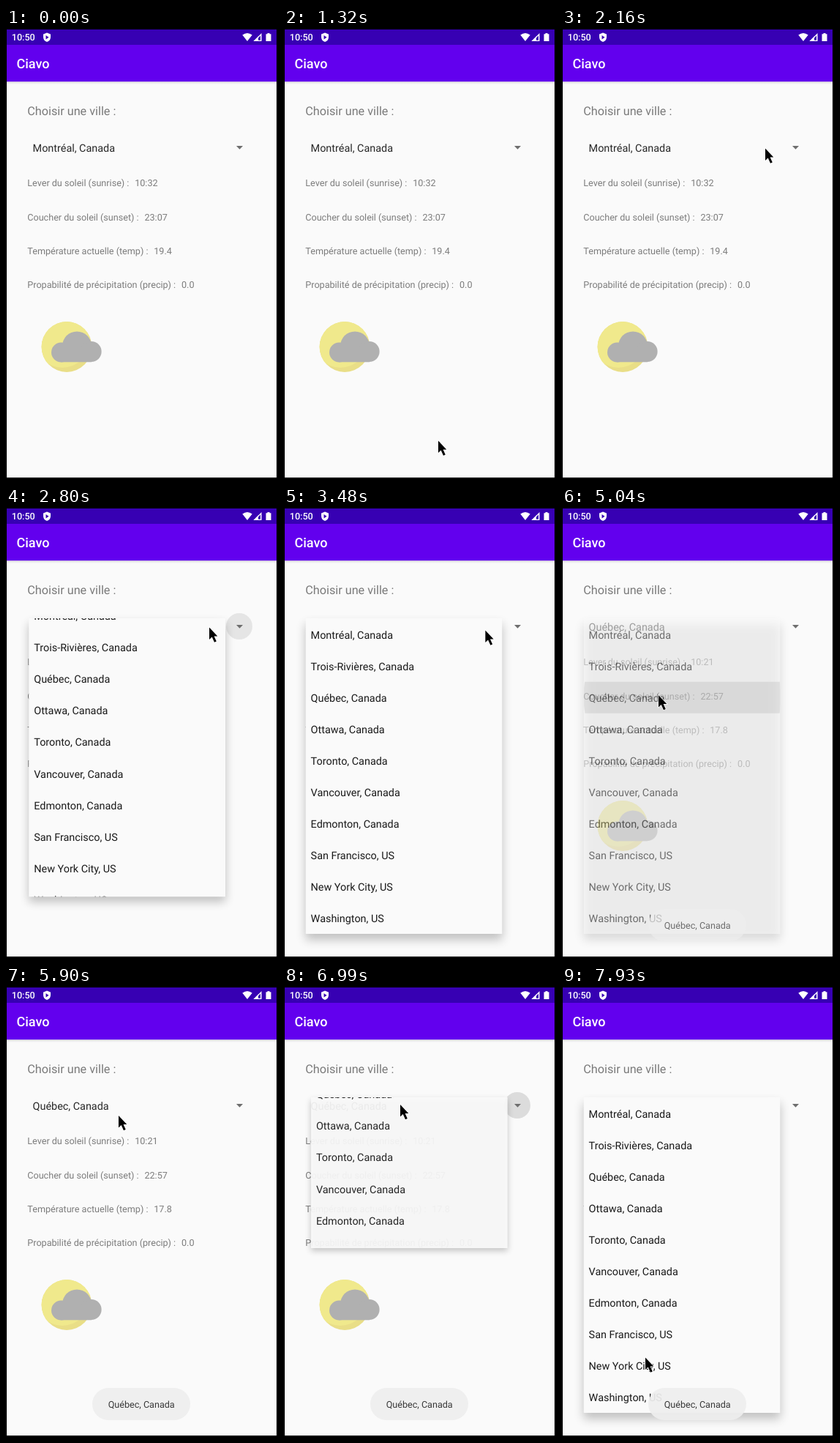
Write an HTML page that moves like this. It is 372 px wide and 616 px high and loops after 8000 ms.

```html
<!DOCTYPE html>
<html lang="fr">
<head>
<meta charset="utf-8">
<title>Ciavo</title>
<style>
  html, body { margin: 0; width: 100%; height: 100%; overflow: hidden; background: #000; }
  svg { display: block; }
  text { font: 400 12.6px Roboto, sans-serif; white-space: pre; text-rendering: geometricPrecision; }
  .title { font-size: 18px; font-weight: 500; fill: #fff; }
  .clock { font-weight: 500; fill: #fff; }
  .heading { font-size: 16.2px; fill: #7a7a7a; }
  .label { fill: #7c7c7c; }
  .city { font-size: 14.4px; fill: #282828; }
  .item { font-size: 14.4px; fill: #1a1a1a; }
  .note { fill: #383838; }
</style>
</head>
<body>
<svg id="stage" width="372" height="616" viewBox="0 0 372 616">
  <defs>
    <filter id="soft" x="-20%" y="-20%" width="140%" height="140%"><feGaussianBlur id="blur" stdDeviation="5"/></filter>
    <linearGradient id="edge" x2="0" y2="1">
      <stop stop-opacity=".12"/><stop offset="1" stop-opacity="0"/>
    </linearGradient>
    <clipPath id="disc"><circle cx="83" cy="435.5" r="34.4"/></clipPath>
    <clipPath id="screen"><rect x="1" y="2" width="369" height="612"/></clipPath>
  </defs>
  <rect width="372" height="616"/>
  <g clip-path="url(#screen)">
    <rect width="372" height="616" fill="#fafafa"/>
    <rect y="73" width="372" height="4" fill="url(#edge)"/>
    <rect y="22" width="372" height="51.2" fill="#6200ee"/>
    <rect width="372" height="23" fill="#3700b3"/>

    <text class="clock" x="7.8" y="17.3">10:50</text>
    <g fill="#fff">
      <path d="M56 6.5l5 2v4.2c0 3-2 5.3-5 6.3c-3-1-5-3.3-5-6.3V8.5z"/>
      <path d="M54.5 10v5.4l4-2.7z" fill="#3700b3"/>
      <path d="M323.3 9.5q6.7-5 13.4 0L330 18z"/>
      <path d="M349.5 7v11h-11zM348 10.500l-6.200 6.200H348z" fill-rule="evenodd"/>
      <path d="M338.5 18l6.5-6.5V18z"/>
      <path d="M355.5 8.200h2V7h3v1.200h2V18h-7z"/>
    </g>
    <text class="title" x="14.5" y="55.3">Ciavo</text>

    <text class="heading" x="29.3" y="119.3">Choisir une ville :</text>
    <text class="city" x="36.6" y="168.8" id="city"></text>
    <g id="labels"></g>

    <g clip-path="url(#disc)">
      <rect x="48" y="400" width="70" height="72" fill="#e9de87"/>
      <circle cx="77" cy="426" r="38" fill="#f0e98c"/>
    </g>
    <g fill="#b0b0b0">
      <circle cx="75.5" cy="443" r="13.5"/>
      <circle cx="97" cy="434.5" r="20"/>
      <circle cx="116.6" cy="442" r="14"/>
      <rect x="75" y="438" width="42" height="18.3"/>
    </g>

    <circle id="press" cx="319" cy="163" r="18" fill="#dcdcdc"/>
    <path d="M315 161h9l-4.5 4.7z" fill="#6e6e6e"/>

    <rect id="shadow" width="269" filter="url(#soft)"/>
    <svg id="panel" y="152" width="269" height="431">
      <rect width="269" height="431" fill="#fafafa"/>
      <g id="list">
        <svg y="86.7" width="269" height="43.1">
          <circle id="ripple" cy="20.5" fill-opacity=".125"/>
        </svg>
      </g>
    </svg>

    <path id="cursor" d="M0 0V16.5L3.7 13L7 20.2L9.8 19L6.6 12H11.3z"
      stroke="#fff" stroke-width="1.4" paint-order="stroke"/>

    <g id="toast">
      <rect x="118" y="549" width="134" height="44" rx="22" fill="#eee" fill-opacity=".93"/>
      <text class="note" x="139.7" y="576">Québec, Canada</text>
    </g>
  </g>
</svg>
<script>
const LOOP = 8000;
const $ = id => document.getElementById(id);
const clamp = v => Math.max(0, Math.min(1, v));
const set = (id, attrs) => {
  for (const name in attrs) $(id).setAttribute(name, attrs[name]);
};

function addText(parent, tag, attrs, content) {
  const el = document.createElementNS('http://www.w3.org/2000/svg', tag);
  for (const name in attrs) el.setAttribute(name, attrs[name]);
  el.textContent = content;
  parent.append(el);
  return el;
}

const cities = ['Montréal, Canada', 'Trois-Rivières, Canada', 'Québec, Canada', 'Ottawa, Canada',
  'Toronto, Canada', 'Vancouver, Canada', 'Edmonton, Canada', 'San Francisco, US',
  'New York City, US', 'Washington, US'];
cities.forEach((name, i) => addText($('list'), 'text', { class: 'item', x: 7.1, y: 27.5 + 43.1 * i }, name));

const values = ['Lever du soleil (sunrise) :', 'Coucher du soleil (sunset) :',
  'Température actuelle (temp) :', 'Propabilité de précipitation (precip) :'
].map((label, i) => {
  const row = addText($('labels'), 'text', { class: 'label', x: 29.3, y: 216.4 + 46.1 * i }, label);
  return addText(row, 'tspan', { dx: 7.8 }, '');
});
const weather = [['10:32', '23:07', '19.4', '0.0'], ['10:21', '22:57', '17.8', '0.0']];

// Number of the n evenly spaced changes between a and b that have happened by t
function changes(t, a, b, n) {
  return t < a ? 0 : Math.min(n, Math.floor((t - a + 4) * (n - 1) / (b - a)) + 1);
}

// cubic-bezier(.4, 0, .2, 1)
function ease(u) {
  let lo = 0, hi = 1;
  for (let i = 0; i < 20; i++) {
    const s = (lo + hi) / 2, r = 1 - s;
    if (1.2 * s * r * r + 0.6 * s * s * r + s * s * s < u) lo = s; else hi = s;
  }
  return lo * lo * (3 - 2 * lo);
}

// Pointer moves: begin, end, changes, then start, bend and end points
const moves = [
  [1240, 2010, 11, [209, 612], [218, 330], [277, 171]],
  [2090, 2160, 2, [277, 171], [278, 168], [278, 164.6]],
  [3480, 4090, 9, [278, 164.6], [240, 222], [176, 239]],
  [4260, 4490, 4, [176, 239], [155, 248], [132, 257]],
  [5590, 5970, 6, [132, 257], [142, 212], [156, 171]],
  [6220, 6450, 4, [156, 171], [158, 166], [159, 162]],
  [7380, 7930, 8, [159, 162], [130, 330], [114, 507.5]]
];

function drawCursor(t) {
  const move = moves.filter(m => t >= m[0]).pop();
  set('cursor', { visibility: move ? 'visible' : 'hidden' });
  if (!move) return;
  const [a, b, n, p, q, r] = move;
  const f = changes(t, a, b, n) / n, s = f * f * (3 - 2 * f);
  const at = i => (1 - s) ** 2 * p[i] + 2 * s * (1 - s) * q[i] + s * s * r[i];
  set('cursor', { transform: `translate(${at(0)} ${at(1)})` });
}

// Each opening: tap, settled, panel starts to unfold
const openings = [[2480, 2930, 2628], [6680, 7150, 6908]];

function drawPopup(t, closing) {
  const opening = openings.filter(o => t >= o[0]).pop();
  let e = 0, alpha = 0, glow = 0, radius = 0;
  if (opening) {
    const [tap, settled, unfold] = opening;
    const k = changes(t, tap, settled, 7);
    const dt = tap + (k - 1) * (settled - tap) / 6 - unfold;
    e = k === 7 ? 1 : ease(clamp(dt / 250));
    alpha = clamp(dt / 92);
    glow = k === 7 ? 0 : clamp(1 - (dt - 90) / 190);
    radius = Math.min(18, 6 + 6 * k);
  }
  if (closing && t < openings[1][0]) alpha = clamp(1 - 0.22 * (closing - 1));
  const h = 431 * e, x = 29.5 + 14 * (1 - e);
  set('press', { r: radius, opacity: glow });
  set('panel', { x, height: h, opacity: alpha });
  set('list', { transform: `translate(0 ${(h - 431) / 2})` });
  set('shadow', { x, y: 152 + 8 * e, height: h, opacity: 0.23 * alpha });
  set('blur', { stdDeviation: 2 + 5 * e });

  const grow = clamp(closing / 3);
  const touched = t >= 4720 && t < openings[1][0];
  set('ripple', { cx: 103 + 32 * grow, r: touched ? 12 + 123 * grow : 0 });
}

function draw(t) {
  const closing = changes(t, 4890, 5340, 7);
  const chosen = closing > 1 ? 1 : 0;
  $('city').textContent = cities[chosen * 2];
  values.forEach((el, i) => el.textContent = weather[chosen][i]);
  set('toast', { opacity: clamp(0.35 * (closing - 1)) });
  drawPopup(t, closing);
  drawCursor(t);
}

const begin = performance.now();
function tick() {
  draw((performance.now() - begin) % LOOP);
  requestAnimationFrame(tick);
}
tick();
</script>
</body>
</html>
```
